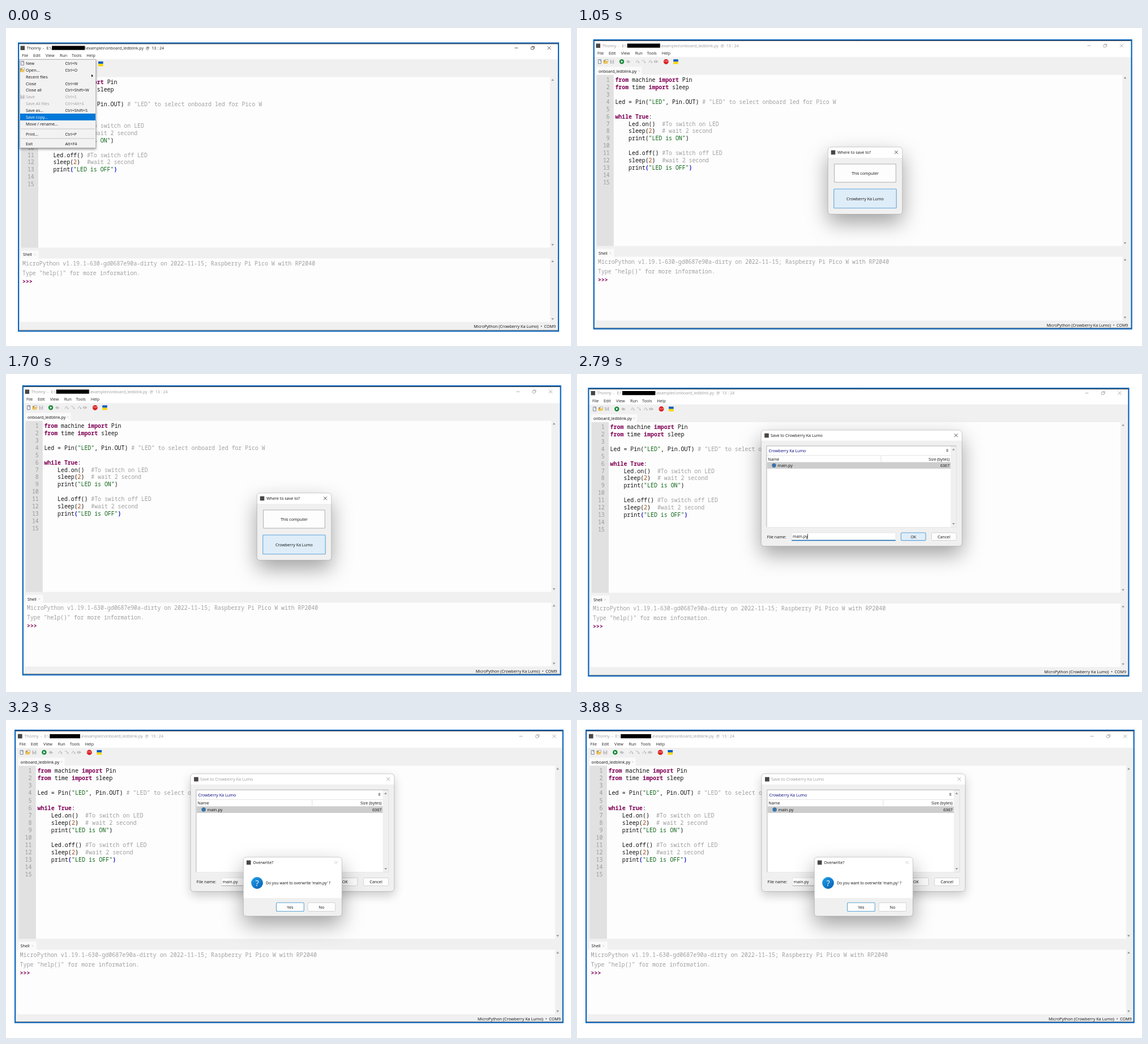
These frames come from a looping animation (998x561 px, 4.32 s). An HTML page with a canvas:

```html
<!DOCTYPE html>
<html lang="en">
<head>
<meta charset="utf-8">
<title>Saving a script to the board</title>
<style>
  html, body { margin: 0; width: 100%; height: 100%; overflow: hidden; background: #fff; }
  canvas { display: block; width: 998px; height: 561px; }
</style>
</head>
<body>
<canvas id="stage" width="998" height="561"></canvas>
<script>
const ctx = document.getElementById('stage').getContext('2d');
const UI = '"Open Sans", "Noto Sans", sans-serif';
const MONO = '"Noto Sans Mono", "DejaVu Sans Mono", monospace';
const BLUE = '#0b66bd', ACCENT = '#5fa6da', FACE = '#f0f0f0', PAPER = '#fdfdfd';
const BOARD = 'Crowberry Ka Lumo';
const MONO_SIZE = 9.92, ADVANCE = MONO_SIZE * 0.6;

// Each view: start time, outer frame, window transform, overlay
const VIEWS = [
  { at: 0,    frame: [21, 25.5, 977, 535.7],     map: [1, 1, 1, 1.5],              over: fileMenu, active: true },
  { at: 1050, frame: [28.7, 20, 980.7, 531.7],   map: [0.994, 1.003, 9.2, -2.6],   over: whereDialog },
  { at: 2140, frame: [19.3, 24.2, 975.5, 533.8], map: [1, 1, 0, 0],                over: () => saveDialog(true) },
  { at: 3230, frame: [15, 17, 984.8, 534.8],     map: [1.0143, 1.0143, -3.9, -5.5], bar: 53,
    over: () => { saveDialog(false); overwriteDialog(); } }
];
const LOOP = 4320;

const CODE = [
  'from machine import Pin',
  'from time import sleep',
  '',
  'Led = Pin("LED", Pin.OUT) # "LED" to select onboard led for Pico W',
  '',
  'while True:',
  '    Led.on()  #To switch on LED',
  '    sleep(2)  # wait 2 second',
  '    print("LED is ON")',
  '',
  '    Led.off() #To switch off LED',
  '    sleep(2)  #wait 2 second',
  '    print("LED is OFF")',
  '', ''
];

function rect(x0, y0, x1, y1, fill, stroke, r = 0, lw = 1) {
  ctx.beginPath();
  ctx.roundRect(x0, y0, x1 - x0, y1 - y0, r);
  if (fill) { ctx.fillStyle = fill; ctx.fill(); }
  if (stroke) { ctx.strokeStyle = stroke; ctx.lineWidth = lw; ctx.stroke(); }
}

function path(points, color, lw = 0.8) {
  ctx.beginPath();
  points.forEach(([x, y], i) => i ? ctx.lineTo(x, y) : ctx.moveTo(x, y));
  ctx.strokeStyle = color;
  ctx.lineWidth = lw;
  ctx.stroke();
}

function poly(points, fill) {
  ctx.beginPath();
  points.forEach(([x, y]) => ctx.lineTo(x, y));
  ctx.closePath();
  ctx.fillStyle = fill;
  ctx.fill();
}

function disc(x, y, r, fill) {
  ctx.beginPath();
  ctx.arc(x, y, r, 0, Math.PI * 2);
  ctx.fillStyle = fill;
  ctx.fill();
}

// y is the middle of the capitals
function label(text, x, y, color = '#111', align = 'left', size = 7.15) {
  ctx.font = `${size}px ${UI}`;
  ctx.textAlign = align;
  ctx.fillStyle = color;
  ctx.fillText(text, x, y + size * 0.36);
}

function mono(text, x, y, color, bold = false, align = 'left') {
  ctx.font = `${bold ? 'bold ' : ''}${MONO_SIZE}px ${MONO}`;
  ctx.textAlign = align;
  ctx.fillStyle = color;
  ctx.fillText(text, x, y + 3.4);
}

function cross(x, y, r, color, lw = 0.8) {
  path([[x - r, y - r], [x + r, y + r]], color, lw);
  path([[x + r, y - r], [x - r, y + r]], color, lw);
}

function arrow(x, y, dir) {
  poly([[x - 2.4, y + dir * 1.6], [x + 2.4, y + dir * 1.6], [x, y - dir * 1.8]], '#999');
}

function appIcon(x, y) { rect(x - 3.8, y - 3.8, x + 3.8, y + 3.8, '#4a4644'); }

function pageIcon(x, y) {
  rect(x - 2.3, y - 3.5, x + 2.5, y + 3.5, '#fff', '#56617a', 0, 0.8);
  path([[x + 0.5, y - 3.5], [x + 0.5, y - 1.3], [x + 2.5, y - 1.3]], '#56617a', 0.6);
}

function folderIcon(x, y) {
  rect(x - 4, y - 3, x + 2.8, y + 3.4, '#c99a35');
  rect(x - 1, y - 3.8, x + 3.8, y - 0.5, '#f5f5f5', '#777', 0, 0.5);
  poly([[x - 4, y + 3.4], [x - 2, y - 0.6], [x + 4.6, y - 0.6], [x + 2.8, y + 3.4]], '#f1c75b');
}

function diskIcon(x, y, color) {
  rect(x - 3.4, y - 3.4, x + 3.4, y + 3.4, color);
  rect(x - 1.8, y - 3.2, x + 1.8, y - 0.6, '#eee');
  rect(x - 2, y + 0.8, x + 2, y + 3.2, '#ddd');
}

function toolbar() {
  const y = 61.7, dim = '#c2c2c2';
  pageIcon(31, y);
  folderIcon(42, y);
  diskIcon(53, y, '#b9b9bd');
  disc(70.3, y, 4.2, '#168a37');
  poly([[69, y - 2.2], [72.6, y], [69, y + 2.2]], '#fff');
  disc(81, y, 2.3, dim);
  poly([[82, y - 2.2], [86, y + 0.5], [82, y + 3]], dim);
  for (const [x, tilt] of [[98, -2], [109, 2], [121, -2]]) {
    path([[x - 3, y - tilt], [x, y - 2.2], [x + 2.6, y + 1]], dim, 1.1);
    poly([[x + 3.8, y + 2.8], [x + 0.5, y + 2.2], [x + 3.2, y - 0.6]], dim);
  }
  rect(127.5, y - 1.8, 130, y + 1.8, dim);
  poly([[130.5, y - 3], [135.5, y], [130.5, y + 3]], dim);
  const stop = Array.from({ length: 8 }, (_, i) => {
    const a = (i + 0.5) * Math.PI / 4;
    return [149 + 4.7 * Math.cos(a), y + 4.7 * Math.sin(a)];
  });
  poly(stop, '#d81e1e');
  label('STOP', 149, y, '#fff', 'center', 3.1);
  rect(162, 57.6, 170.6, 61.8, '#0a5cbc');
  rect(162, 61.8, 170.6, 65.9, '#ffd500');
}

function codeLine(text, y, matched) {
  const re = /(#.*)|("[^"]*")|\b(from|import|while|True)\b|(\d)|([()])|([^#"\d()\s]+?(?=[#"\d()\s]|$))/g;
  for (const m of text.matchAll(re)) {
    const color = m[1] ? '#a0a0a0' : m[2] ? '#0b6414' : m[3] ? '#7f0055' : m[4] ? '#b04a12'
      : m[5] && matched ? '#1414c8' : '#111';
    mono(m[0], 58.6 + m.index * ADVANCE, y, color, !!m[3] || (!!m[5] && matched));
  }
}

function titleBar(v) {
  const ink = v.active ? '#222' : '#9a9a9a', y = 33.7;
  rect(15, 17, 985, 53.7, '#fff');
  appIcon(28.3, y);
  label('Thonny', 35.7, y, ink);
  label('-', 64, y, ink);
  label('E:\\', 70.5, y, ink);
  label('a\\examples\\onboard_ledblink.py', 242, y, ink, 'right', 7.05);
  label('@  13 : 24', 246, y, ink);
  rect(80, 30, 80 + (v.bar || 58.3), 37.2, '#000');
  const tool = v.active ? '#333' : '#9a9a9a';
  path([[897.5, y], [903.5, y]], tool);
  rect(926.3, y - 1.7, 931, y + 2.7, null, tool, 1, 0.8);
  path([[927.8, y - 2.9], [932.3, y - 2.9], [932.3, y + 1.4]], tool);
  cross(958.5, y, 3, tool);
  [['File', 27], ['Edit', 47], ['View', 69], ['Run', 94], ['Tools', 115], ['Help', 141.3]]
    .forEach(([s, x]) => label(s, x, 47.2, '#222'));
}

function mainWindow(v) {
  rect(10, 10, 990, 545, FACE);
  titleBar(v);
  toolbar();

  rect(25, 71, 106, 85.5, '#fafafa');
  label('onboard_ledblink.py', 29, 78.3);
  cross(101, 78.2, 1.1, '#bbb', 0.6);
  rect(26, 85, 56, 386, '#e1e1e1');
  rect(56, 85, 960, 386, PAPER);
  CODE.forEach((line, i) => {
    const y = 94 + i * 12.87;
    mono(String(i + 1), 48.8, y, '#9a9a9a', false, 'right');
    codeLine(line, y, i === 12);
  });

  rect(25, 391, 57, 405.5, '#fafafa');
  label('Shell', 29, 398.4);
  cross(50, 398.2, 1.1, '#bbb', 0.6);
  rect(23, 405, 960, 517, PAPER);
  mono('MicroPython v1.19.1-630-gd0687e90a-dirty on 2022-11-15; Raspberry Pi Pico W with RP2040', 28, 413.7, '#a0a0a0');
  mono('Type "help()" for more information.', 28, 430.7, '#a0a0a0');
  mono('>>>', 28, 445.6, '#7f0055', true);

  for (const [y, dir] of [[90, 1], [381, -1], [410, 1], [512, -1]]) arrow(964.6, y, dir);
  label(`MicroPython (${BOARD})  •  COM9`, 970, 525, '#111', 'right');
}

function shadowed(x0, y0, x1, y1, r, fill, drop, blur, alpha) {
  ctx.save();
  ctx.shadowColor = `rgba(0,0,0,${alpha})`;
  ctx.shadowBlur = blur;
  ctx.shadowOffsetY = drop;
  rect(x0, y0, x1, y1, fill, null, r);
  ctx.restore();
}

// Rounded window with a white top part down to split
function dialog(x0, y0, x1, y1, split, active = true) {
  if (active) shadowed(x0, y0, x1, y1, 5, FACE, 15, 36, 0.36);
  else shadowed(x0, y0, x1, y1, 5, FACE, 7, 18, 0.2);
  rect(x0, y0, x1, split, '#fff', null, [5, 5, 0, 0]);
  rect(x0, y0, x1, y1, null, 'rgba(120,120,120,.5)', 5, 0.7);
}

function button(text, x0, y0, x1, y1, focus, fill = PAPER, r = 2, border = '#d0d0d0') {
  rect(x0, y0, x1, y1, fill, focus ? ACCENT : border, r, focus ? 1.1 : 0.9);
  label(text, (x0 + x1) / 2, (y0 + y1) / 2 + 0.3, '#111', 'center');
}

function fileMenu() {
  const dim = '#9c9c9c';
  shadowed(24, 55, 159, 212, 0, '#f2f2f2', 2, 4, 0.4);
  rect(24.5, 55.5, 158.7, 211.5, null, '#a3a3a3', 0, 0.8);
  rect(25, 151, 158, 163, '#0078d7');
  [
    ['New', 'Ctrl+N', 62], ['Open...', 'Ctrl+O', 74], ['Recent files', '', 86],
    ['Close', 'Ctrl+W', 98], ['Close all', 'Ctrl+Shift+W', 109.7],
    ['Save', 'Ctrl+S', 121.6, dim], ['Save All files', 'Ctrl+Alt+S', 133.4, dim],
    ['Save as...', 'Ctrl+Shift+S', 145.5], ['Save copy...', '', 157.2, '#fff'],
    ['Move / rename...', '', 169], ['Print...', 'Ctrl+P', 187], ['Exit', 'Alt+F4', 204.5]
  ].forEach(([name, keys, y, color]) => {
    label(name, 35, y, color, 'left', 7.25);
    label(keys, 104.5, y, color, 'left', 7.25);
  });
  for (const y of [178, 195]) path([[26, y], [157, y]], '#b5b5b5');
  poly([[151, 81.7], [154, 84.2], [151, 86.7]], '#111');
  pageIcon(29, 62);
  folderIcon(29, 74);
  diskIcon(29, 121.6, '#b4b2c4');
}

function whereDialog() {
  dialog(443.3, 210, 574.7, 328.5, 229);
  appIcon(452.5, 219.5);
  label('Where to save to?', 460, 219.7);
  cross(564, 219.3, 2.9, '#222');
  button('This computer', 454.5, 240, 563.3, 272, false, PAPER, 0, '#a6a6a6');
  button(BOARD, 453.7, 284, 564.2, 317.7, true, '#deedf8', 1);
}

function saveDialog(active) {
  const v = VIEWS[active ? 2 : 3], ink = active ? '#111' : '#9a9a9a';
  ctx.save();
  useMap(v);
  dialog(325.3, 99, 680, 303.7, 117.5, active);
  appIcon(335, 108.5);
  label(`Save to ${BOARD}`, 342, 108.5, ink);
  cross(669.5, 108.2, 3, active ? '#222' : '#9a9a9a');

  rect(335, 127, 670, 270, FACE, '#dcdcdc', 0, 0.8);
  rect(335, 127, 660, 270, '#fff');
  path([[670, 127], [335, 127], [335, 270]], '#a8a8a8', 0.8);
  label(BOARD, 338.5, 135.7, '#00007c');
  for (const dy of [-1.7, 0, 1.7]) path([[652.3, 134.8 + dy], [655.7, 134.8 + dy]], '#444', 0.8);
  path([[336, 143.8], [660, 143.8]], '#ddd', 0.8);
  path([[537, 144], [537, 155]], '#d8d8d8', 0.8);
  label('Name', 337.3, 150);
  label('Size (bytes)', 658, 150, '#111', 'right');
  rect(336, 155.5, 660, 167, '#cdcdcd');
  disc(348, 161.2, 3.7, '#3b74a8');
  label('main.py', 354.3, 161.6);
  label('6367', 658, 161.6, '#111', 'right');
  arrow(665, 133, 1);
  arrow(665, 264.5, -1);

  label('File name:', 335.7, 287);
  rect(379, 280, 563, 294, '#fff', '#dcdcdc', 1, 0.7);
  path([[379.3, 293.5], [562.7, 293.5]], active ? '#1268b3' : '#999', active ? 1.3 : 0.8);
  label('main.py', 381, 286.8);
  if (active) path([[407.3, 282], [407.3, 291.5]], '#111');
  button('OK', 572.3, 280, 616, 293.6, active, active ? '#e0eef9' : PAPER);
  button('Cancel', 626.3, 280, 670, 293.6, false);
  ctx.restore();
}

function overwriteDialog() {
  dialog(419.3, 242, 593.3, 346, 314);
  appIcon(428.7, 251.5);
  label('Overwrite?', 436.3, 251.7);
  cross(583, 251.3, 2.8, '#c4c4c4');
  const glow = ctx.createLinearGradient(436, 278, 451, 298);
  glow.addColorStop(0, '#1c9be8');
  glow.addColorStop(1, '#0a61b4');
  disc(443.5, 287.5, 10.4, glow);
  label('?', 443.5, 287.5, '#fff', 'center', 14.5);
  label("Do you want to overwrite 'main.py' ?", 459, 287.7, '#111', 'left', 6.75);
  button('Yes', 477.5, 322.3, 526.3, 337.5, true);
  button('No', 533, 322.3, 581.7, 337.5, false);
}

function useMap(v) {
  const [sx, sy, x, y] = v.map;
  ctx.setTransform(sx, 0, 0, sy, x, y);
}

function draw(v) {
  const [x0, y0, x1, y1] = v.frame;
  rect(0, 0, 998, 561, '#fff');
  ctx.save();
  ctx.beginPath();
  ctx.rect(x0, y0, x1 - x0, y1 - y0);
  ctx.clip();
  useMap(v);
  mainWindow(v);
  ctx.restore();
  rect(x0 + 1.1, y0 + 1.1, x1 - 1.1, y1 - 1.1, null, BLUE, 0, 2.2);
  path([[x0 + 2, y0 + 2.4], [x1 - 2, y0 + 2.4]], '#333', 1);
  path([[x0 + 2, y1 - 2.5], [x1 - 2, y1 - 2.5]], '#5a5a5a', 0.7);
  v.over();
}

const start = performance.now();
let shown = null;
function tick() {
  const t = (performance.now() - start) % LOOP;
  const v = VIEWS.findLast(view => t >= view.at);
  if (v !== shown) draw(shown = v);
  requestAnimationFrame(tick);
}
tick();
</script>
</body>
</html>
```
